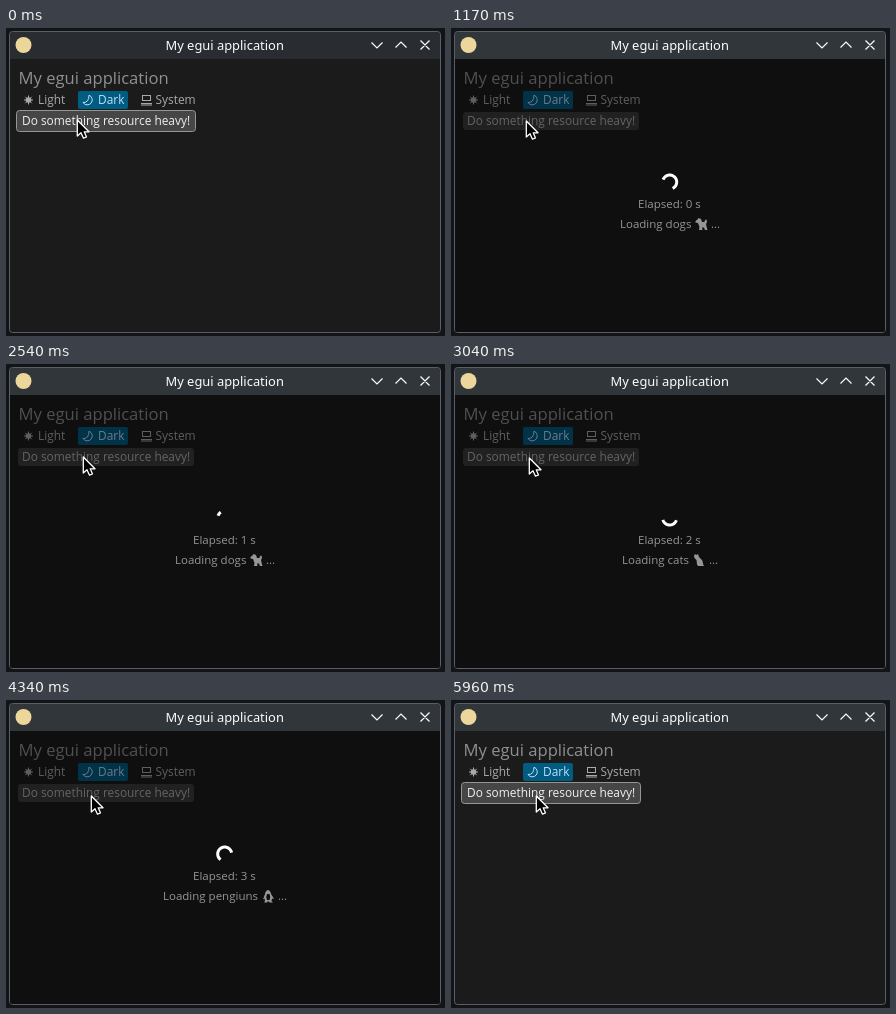
These frames come from a looping animation (439 by 308 pixels, 6.29 s). An HTML page:

```html
<!DOCTYPE html>
<html lang="en">
<head>
<meta charset="utf-8">
<title>My egui application</title>
<style>
  html, body { margin: 0; width: 100%; height: 100%; overflow: hidden; background: #121417; }
  svg { display: block; width: 439px; height: 308px; }
  text { font: 11.9px "Open Sans", "Noto Sans", sans-serif; fill: #aaa; white-space: pre; }
  .title { font: 12.9px "Noto Sans", sans-serif; fill: #fcfcfc; }
  .heading { font-size: 16.6px; fill: #909090; }
  .line { fill: none; stroke: #aaa; }
  .controls { fill: none; stroke: #fcfcfc; stroke-width: 1.2; }
  .selected { fill: #c0deff; }
  #modal text { font-size: 11.5px; fill: #969696; }
  .pet { fill: #969696; }
</style>
</head>
<body>
<svg viewBox="0 0 439 308">
  <rect x="3.5" y="3.5" width="431" height="301" rx="3" fill="#1b1b1b"/>
  <path id="bar" d="M4 31V7q0-3 3-3H431q3 0 3 3V31Z"/>
  <rect x="3.5" y="3.5" width="431" height="301" rx="3" fill="none" stroke="#5a5f64"/>
  <circle cx="17.5" cy="17" r="8" fill="#ecd69a"/>
  <text class="title" x="159.500" y="22">My egui application</text>
  <path class="controls" d="M365.500 14.500l5.500 5.500 5.500-5.500M389.500 19.500l5.500-5.500 5.500 5.500M414.500 12.500l9 9M423.500 12.500l-9 9"/>

  <text class="heading" x="12.500" y="56">My egui application</text>

  <g class="line" transform="translate(22.500 72)">
    <circle r="2.800" fill="#aaa" stroke="none"/>
    <path d="M-4.500 0H4.500M0-4.500V4.500M-3.200-3.200l6.400 6.400M3.200-3.200l-6.400 6.400"/>
  </g>
  <text x="32" y="76">Light</text>

  <rect x="72" y="63" width="50" height="18" rx="2" fill="#005c80"/>
  <path d="M83 67.200a5 5 0 1 1-6 7.300q6 .3 6-7.300Z" fill="none" stroke="#c0deff"/>
  <text class="selected" x="92" y="76">Dark</text>

  <g class="line">
    <rect x="136.500" y="67.500" width="8" height="5"/>
    <path d="M135 75.500h11M135 77h11"/>
  </g>
  <text x="149.500" y="76">System</text>

  <rect id="button" rx="3"/>
  <text id="label" x="16" y="97">Do something resource heavy!</text>

  <g id="modal">
    <rect x="4" y="31" width="430" height="273" fill="#000" fill-opacity=".45"/>
    <path id="spinner" fill="none" stroke="#fff" stroke-width="3"/>
    <text id="elapsed" x="187" y="180"></text>
    <text id="loading" y="200"></text>
    <path id="pet" class="pet" fill-rule="evenodd"/>
    <text id="dots" y="200">...</text>
  </g>

  <path id="cursor" d="M.3 0V16L4 12.800L6.500 18.200L9.500 17L7.200 11.800H12Z" fill="#000" stroke="#fff" stroke-width="1.300" stroke-linejoin="round"/>
</svg>
<script>
const LOOP = 6290, PRESS = 590, OPEN = 820, CLOSE = 5960, FADE = 100, SECOND = 1024;
const $ = id => document.getElementById(id);
const clamp = v => Math.min(1, Math.max(0, v));
const mix = (a, b, k) => a + (b - a) * k;

function set(id, attrs) {
  for (const name in attrs) $(id).setAttribute(name, attrs[name]);
}

const pets = [
  { name: 'dogs', from: 0, x: 169, icon: 244.5, dots: 260,
    d: 'M0 3L2 1.500L3 0L5.500 1L6.500 4H9L9.500 2L11 1.500L11.500 4L10.500 6L11 8.500L12 12H9.500L8.500 9.500L6.500 9.500L7 12H3.500L4 9L2.500 5L0 4.500Z' },
  { name: 'cats', from: 2, x: 171, icon: 243, dots: 258,
    d: 'M0 2L1 0L2.500 1L4 0L5 3L8 6Q9 8 9 10L10 12H4L3 10.500L2.500 6L.5 4Z' },
  { name: 'pengiuns', from: 3, x: 157, icon: 257, dots: 272,
    d: 'M2.500 2Q5-2 7.500 2L8 4Q10 7 11 9L9 8.500L8.500 11L10 12.500H6.500L6 11.500H4.500L4 12.500H1L2 11L1.500 8.500L0 9.500L2 4ZM4 4Q2.500 7 4 10H6.500Q8 7 6.500 4Z' }
];

const buttonLooks = {
  hover: [{ x: 10.5, y: 82.5, width: 179, height: 21, fill: '#464646', stroke: '#969696' }, '#f0f0f0'],
  press: [{ x: 10.5, y: 82.5, width: 179, height: 21, fill: '#373737', stroke: '#fff' }, '#fff'],
  idle: [{ x: 12, y: 84, width: 176, height: 18, fill: '#3c3c3c', stroke: 'none' }, '#b4b4b4']
};

// time, x, y of the pointer tip
const trail = [
  [0, 71, 92], [1000, 71, 92], [1250, 77, 93], [3000, 77, 93],
  [3150, 80, 95], [3900, 80, 95], [4300, 85, 96], [LOOP, 85, 96]
];

function pointer(ms) {
  const i = trail.findIndex(p => p[0] > ms);
  const a = trail[i - 1], b = trail[i], k = (ms - a[0]) / (b[0] - a[0]);
  return `translate(${Math.round(mix(a[1], b[1], k))} ${Math.round(mix(a[2], b[2], k))})`;
}

// The arc turns once a second while its length swings with a sine.
function arc(ms) {
  const start = (198 + 0.36 * (ms - 2540)) * Math.PI / 180;
  const sweep = 4 * Math.PI / 3 * Math.sin(ms / 1000 - 2.385);
  const points = [];
  for (let i = 0; i <= 24; i++) {
    const a = start + sweep * i / 24;
    points.push(`${(218.7 + 7 * Math.cos(a)).toFixed(2)} ${(154 + 7 * Math.sin(a)).toFixed(2)}`);
  }
  return 'M' + points.join('L');
}

function drawModal(ms) {
  const count = Math.min(4, Math.max(0, Math.floor((ms - 840) / SECOND)));
  const pet = pets.filter(p => p.from <= count).pop();
  $('elapsed').textContent = `Elapsed: ${count} s`;
  $('loading').textContent = `Loading ${pet.name}`;
  set('loading', { x: pet.x });
  set('pet', { d: pet.d, transform: `translate(${pet.icon} 190)` });
  set('dots', { x: pet.dots });
  set('spinner', { d: arc(ms) });
}

function draw(ms) {
  const focus = clamp((ms - PRESS) / 160);
  const [r, g, b] = [[41, 49], [45, 54], [49, 59]].map(c => Math.round(mix(...c, focus)));
  set('bar', { fill: `rgb(${r},${g},${b})` });

  const open = ms >= OPEN && ms < CLOSE;
  const pressed = ms >= PRESS && ms < OPEN;
  const [box, ink] = buttonLooks[open ? 'idle' : pressed ? 'press' : 'hover'];
  set('button', box);
  $('label').style.fill = ink;

  set('modal', { opacity: open ? clamp((ms - OPEN) / FADE) : 0 });
  if (open) drawModal(ms);
  set('cursor', { transform: pointer(ms) });
}

const began = performance.now();
function tick() {
  draw((performance.now() - began) % LOOP);
  requestAnimationFrame(tick);
}
tick();
</script>
</body>
</html>
```
